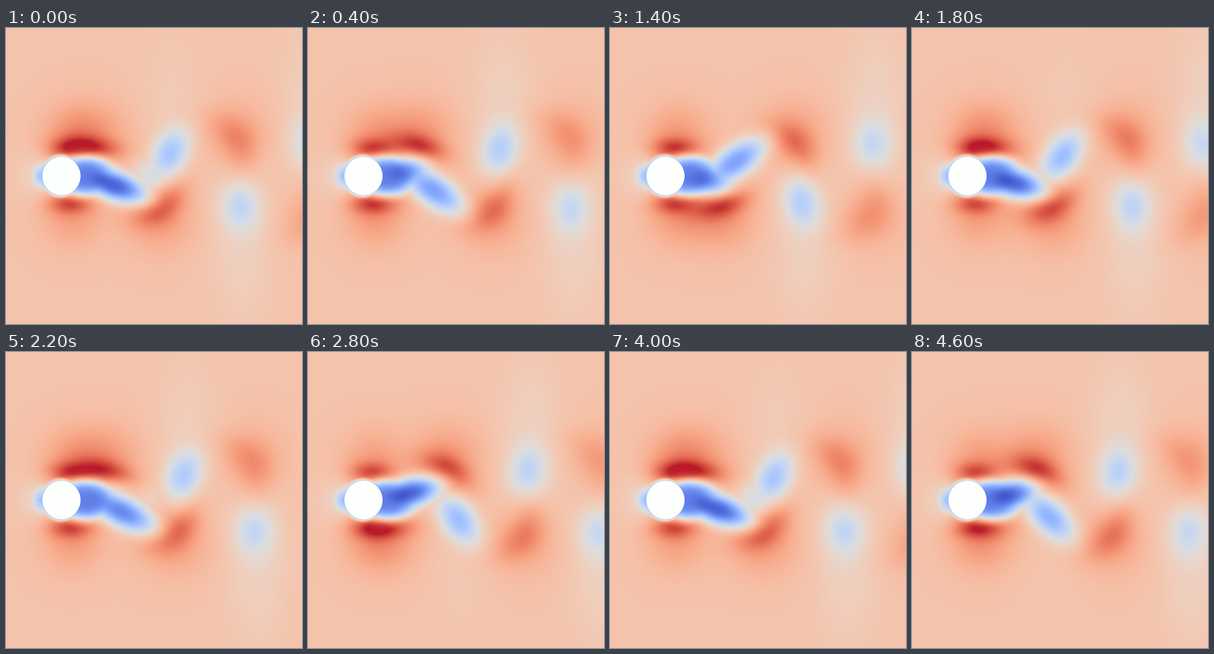
A matplotlib script that plays this animation: 512 by 512 pixels, repeating every 4.8 s.

```python
import numpy as np
import matplotlib.pyplot as plt
from matplotlib.animation import FuncAnimation
from matplotlib.patches import Circle

SIZE, FRAMES, STEP_MS = 512, 24, 200
PERIOD_MS = 2000          # one vortex shedding cycle
CX, CY, RADIUS = 96, 256, 33
GRID = 256
FREE, SLOW = 0.628, 0.03  # colour values of free stream and reversed flow

axis = (np.arange(GRID) + 0.5) * SIZE / GRID
X, Y = np.meshgrid(axis, axis)
MID = Y - CY
RIM = np.maximum(np.hypot(X - CX, MID) - RADIUS, 0)


def ease(age, centre, width):
    """Smooth switch from 0 to 1."""
    return 1 / (1 + np.exp((centre - age) / width))


def release(age, width):
    """Rests near 0, then grows in step with age."""
    return width * np.log1p(np.exp(age / width))


def ellipse(out, x, off, length, thick, angle=0, bend=0):
    a = np.radians(angle)
    dx, dy = X - x, out - off
    u = dx * np.cos(a) + dy * np.sin(a)
    v = dy * np.cos(a) - dx * np.sin(a) + bend * u**2
    return (u / length) ** 2 + (v / thick) ** 2


def bump(out, *shape):
    return np.exp(-ellipse(out, *shape))


def ages(phase):
    """Ages of every structure of one side that is still in view."""
    return [a for a in (phase % 1 + k for k in (-1, 0, 1)) if -0.5 <= a <= 1.5]


def lobe(out, age):
    """Slow fluid: grows behind the cylinder, tilts upright and drifts off."""
    grown = max(age, 0)
    x = 160 + 245 * release(age, 0.14)
    off = 56 * ease(age, 0.28, 0.28)
    length = 43 + 20 * np.exp(-((age - 0.08) / 0.25) ** 2)
    thick = 25 + 8 * min(grown, 1)
    angle = 92 * ease(age, 0.32, 0.24)
    amp = ease(age, -0.38, 0.05) * (0.28 + 0.68 * np.exp(-grown / 0.42))
    q = ellipse(out, x, off, length, thick, angle)
    slow = amp * np.exp(-q ** (1.2 - 0.25 * min(grown, 1)))
    wash = 0.05 * np.clip((age - 0.2) / 0.5, 0, 1)
    return slow, wash * bump(out, x + 5, off + 80, 55, 125)


def crest(out, age):
    """Fast fluid: peels off the cylinder and bends into a comma."""
    grown = np.clip(age, 0, 1.2)
    x = 137 + 265 * release(age, 0.12)
    off = 49 + 12 * ease(age, 0.6, 0.25)
    angle = -70 * ease(age, 0.5, 0.25)
    amp = 0.21 * ease(age, -0.12, 0.1) * np.exp(-max(age - 0.3, 0) / 1.1)
    core = bump(out, x, off, 46 + 10 * grown, 18 + 14 * grown, angle,
                0.005 * grown)
    return amp * (core + 0.65 * bump(out, x - 4, off + 18, 60, 58))


def field(phase):
    link = max(0, np.cos(4 * np.pi * phase))
    fast = np.full_like(X, FREE)
    masks = [
        0.86 * np.exp(-ellipse(MID, 137, 0, 52, 34) ** 2),
        0.55 * bump(MID, 63, 0, 17, 21),
        0.12 * bump(MID, 55, 0, 34, 38),
        0.45 * np.exp(-(RIM / 4.5) ** 2),
        0.28 * link * bump(MID, 250, 0, 30, 30),
    ]
    for side, shift in ((1, 0), (-1, 0.5)):
        out = side * MID
        fast += 0.19 * bump(out, 109, 48, 38, 18)
        fast += 0.11 * bump(out, 114, 64, 52, 56)
        for age in ages(phase + shift):
            slow, wash = lobe(out, age)
            masks.append(slow)
            fast -= wash
        for age in ages(phase + shift + 0.5):
            fast += crest(out, age)
    slow = np.clip(sum(m**5 for m in masks) ** 0.2, 0, 1)
    return np.clip(np.minimum(fast, 0.98) * (1 - slow) + SLOW * slow, 0, 1)


fig = plt.figure(figsize=(5.12, 5.12), dpi=100)
ax = fig.add_axes([0, 0, 1, 1])
ax.axis("off")
image = ax.imshow(field(0), cmap="coolwarm", vmin=0, vmax=1,
                  extent=(0, SIZE, SIZE, 0), interpolation="bilinear")
ax.add_patch(Circle((CX, CY), RADIUS, fc="#fdfffc", ec="none"))
ax.set_xlim(0, SIZE)
ax.set_ylim(SIZE, 0)


def update(i):
    image.set_data(field(i * STEP_MS / PERIOD_MS))
    return [image]


anim = FuncAnimation(fig, update, frames=FRAMES, interval=STEP_MS,
                     repeat=True, repeat_delay=0)
plt.show()
```
